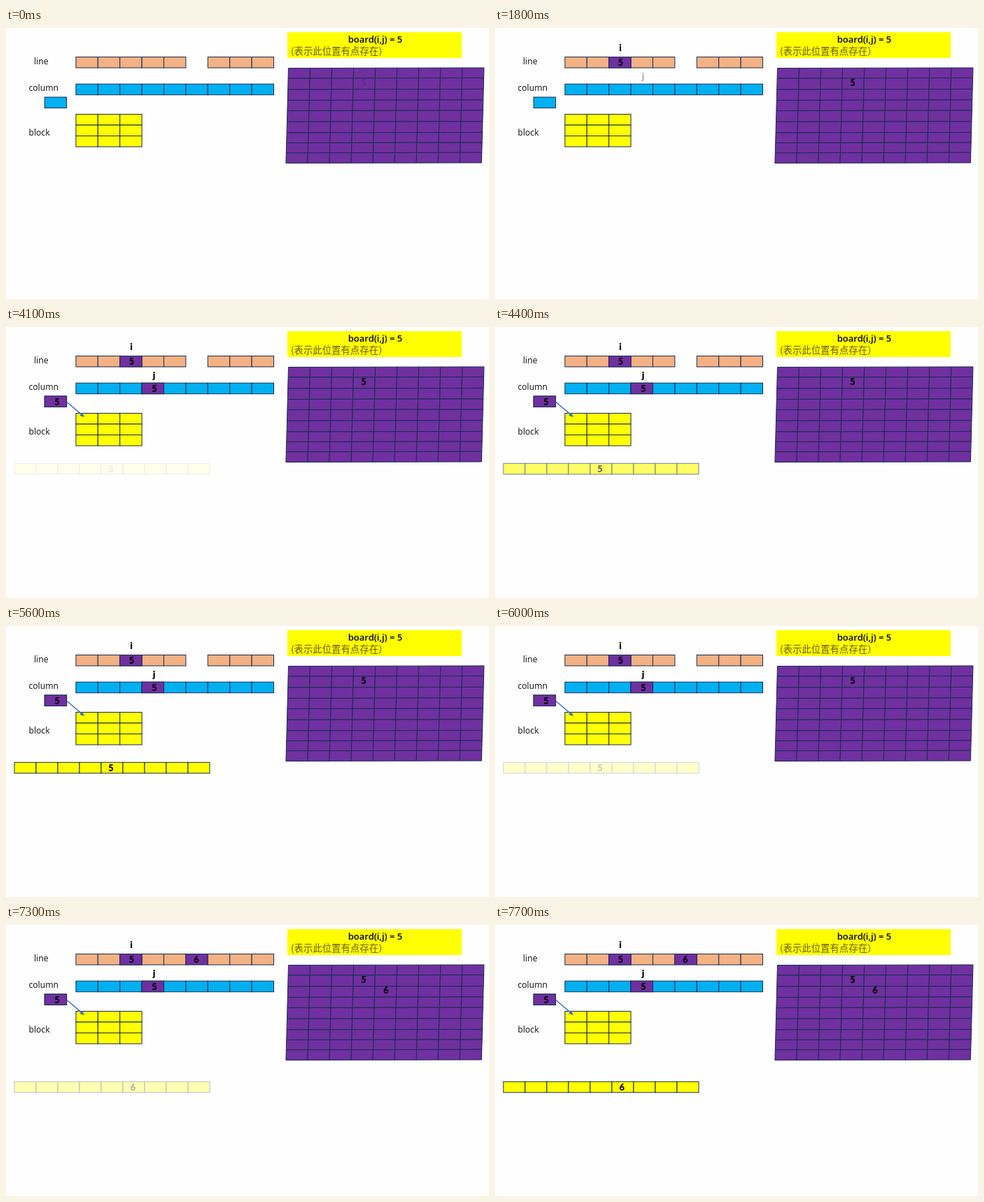
These frames come from a looping animation (690x388 px, 8000 ms). An HTML page:

```html
<!DOCTYPE html>
<html lang="zh">
<head>
<meta charset="utf-8">
<title>Board marks</title>
<style>
html, body { margin: 0; width: 100%; height: 100%; overflow: hidden; background: #fefefe; }
svg { display: block; width: 690px; height: 388px; }
.label { font: 12.1px "Noto Sans", sans-serif; fill: #1c1c1c; }
.title { font: 600 13px "Open Sans", sans-serif; text-anchor: middle; }
.note { font: 13.4px "Noto Sans CJK SC", "Noto Sans CJK", sans-serif; fill: #6b5a00; }
.mark { font: 900 12.6px Lato, sans-serif; text-anchor: middle; }
.index { font: 900 13.6px Lato, sans-serif; text-anchor: middle; }
</style>
</head>
<body>
<svg id="stage" viewBox="0 0 690 388"></svg>
<script>
const LOOP = 8000, STEP = 100;
const ORANGE = '#f4b183', BLUE = '#00b0f0', YELLOW = '#ffff00', PURPLE = '#7030a0', EDGE = '#172c51';
const CELL = 31.4, TALL = 15.5;
const stage = document.getElementById('stage');

function add(parent, tag, attrs, text) {
  const el = document.createElementNS('http://www.w3.org/2000/svg', tag);
  for (const key in attrs) el.setAttribute(key, attrs[key]);
  if (text) el.textContent = text;
  parent.appendChild(el);
  return el;
}

const group = () => add(stage, 'g', {});
const write = (g, kind, x, y, text) => add(g, 'text', { class: kind, x, y }, text);
const mark = (g, x, y, text) => write(g, 'mark', x, y + 4.5, text);

function box(g, x, y, fill, w = CELL, h = TALL) {
  add(g, 'rect', { x, y, width: w, height: h, fill, stroke: EDGE });
}

function table(g, x, y, cols, rows, fill, w = CELL, skip = -1) {
  for (let r = 0; r < rows; r++)
    for (let c = 0; c < cols; c++)
      if (c !== skip) box(g, x + c * w, y + r * TALL, fill, w);
}

// Purple board, leaning slightly to the left
function board(g) {
  const ys = [57.5, 72, 88, 103.5, 118.5, 134.3, 150, 164.5, 178.8, 193.5];
  const point = (c, r) =>
    `${(403.5 + c * 31.05 - r * 0.4).toFixed(2)},${(ys[r] - c * 0.06).toFixed(2)}`;
  for (let r = 0; r < 9; r++)
    for (let c = 0; c < 9; c++)
      add(g, 'polygon', {
        points: [point(c, r), point(c + 1, r), point(c + 1, r + 1), point(c, r + 1)].join(' '),
        fill: PURPLE, stroke: EDGE
      });
}

const base = group();
add(base, 'rect', { x: 402, y: 6, width: 249, height: 37, fill: YELLOW });
write(base, 'title', 527.5, 21, 'board(i,j) = 5');
write(base, 'note', 407, 38, '(表示此位置有点存在）');
write(base, 'label', 40, 52, 'line');
write(base, 'label', 32.5, 90, 'column');
write(base, 'label', 32.5, 154, 'block');
table(base, 99.9, 41.5, 9, 1, ORANGE, CELL, 5);
table(base, 99.9, 80.2, 9, 1, BLUE);
table(base, 99.9, 123.5, 3, 3, YELLOW);
box(base, 55.2, 99, BLUE);
board(base);

function row(g, y, digit, x) {
  table(g, 12, y, 9, 1, YELLOW, 31);
  mark(g, x, y + 8.5, digit);
}

// Painter, then when it fades in and, if it leaves, when it fades out
const parts = [
  [g => mark(g, 511, 78.7, '5'), -50, 450],
  [g => write(g, 'index', 179, 33, 'i'), 650, 1150],
  [g => { box(g, 162.7, 41.5, PURPLE); mark(g, 179.5, 49.5, '5'); }, 1150, 1650],
  [g => write(g, 'index', 211.5, 74, 'j'), 1650, 2150],
  [g => { box(g, 194.1, 80.2, PURPLE); mark(g, 212, 88, '5'); }, 2350, 2750],
  [g => box(g, 55.2, 99, PURPLE), 2700, 3080],
  [g => mark(g, 73, 107, '5'), 3120, 3580],
  [g => {
    add(g, 'path', { d: 'M87 107.5L108 125.4', stroke: '#4472c4', 'stroke-width': 1.6 });
    add(g, 'path', { d: 'M112 129L105.2 127L109 122.5Z', fill: '#4472c4' });
  }, 3580, 4060],
  [g => row(g, 195.3, '5', 150), 4060, 4620, 5600, 6100],
  [g => mark(g, 543, 93.5, '6'), 6050, 6550],
  [g => { box(g, 256.9, 41.5, PURPLE); mark(g, 272, 49.5, '6'); }, 6550, 7050],
  [g => row(g, 224.3, '6', 181.5), 7150, 7650]
].map(([paint, ...times]) => {
  const g = group();
  paint(g);
  return { g, times };
});

const ramp = (t, a, b) => Math.min(1, Math.max(0, (t - a) / (b - a)));

function draw() {
  const t = Math.floor(performance.now() % LOOP / STEP) * STEP;
  for (const { g, times: [a, b, c, d] } of parts)
    g.setAttribute('opacity', ramp(t, a, b) * (c ? 1 - ramp(t, c, d) : 1));
  requestAnimationFrame(draw);
}
draw();
</script>
</body>
</html>
```
